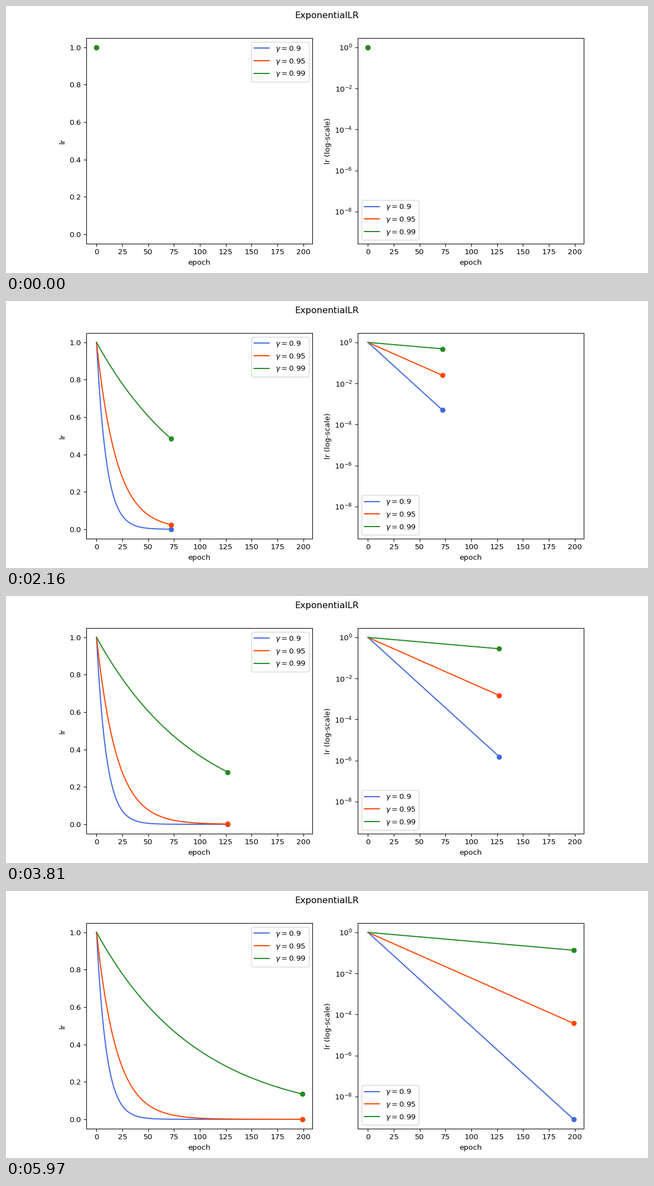
Write a matplotlib script that moves like this. It is 1159 px wide and 483 px high and loops after 6 s.

```python
import matplotlib.pyplot as plt
import numpy as np
from matplotlib.animation import FuncAnimation

EPOCHS = 200
GAMMAS = {0.9: "royalblue", 0.95: "orangered", 0.99: "forestgreen"}

epochs = np.arange(EPOCHS)
# 12 x 5 inches at this density fills the 1159 x 483 pixel stage.
fig, (linear_ax, log_ax) = plt.subplots(1, 2, figsize=(12, 5), dpi=96.6)
fig.suptitle("ExponentialLR")
log_ax.set_yscale("log")

tracks = []
for ax, label, corner in (
    (linear_ax, "lr", "upper right"),
    (log_ax, "lr (log-scale)", "lower left"),
):
    for gamma, color in GAMMAS.items():
        rates = gamma ** epochs
        # The full curve sets the axis limits before it is trimmed per frame.
        line, = ax.plot(epochs, rates, color=color, label=rf"$\gamma=${gamma}")
        dot, = ax.plot(epochs[:1], rates[:1], "o", color=color)
        tracks.append((line, dot, rates))
    ax.set_xlabel("epoch")
    ax.set_ylabel(label)
    ax.legend(loc=corner)


def update(epoch):
    for line, dot, rates in tracks:
        line.set_data(epochs[:epoch + 1], rates[:epoch + 1])
        dot.set_data([epoch], [rates[epoch]])
    return [artist for line, dot, _ in tracks for artist in (line, dot)]


animation = FuncAnimation(fig, update, frames=EPOCHS, interval=30,
                          repeat=True, repeat_delay=0)
plt.show()
```
